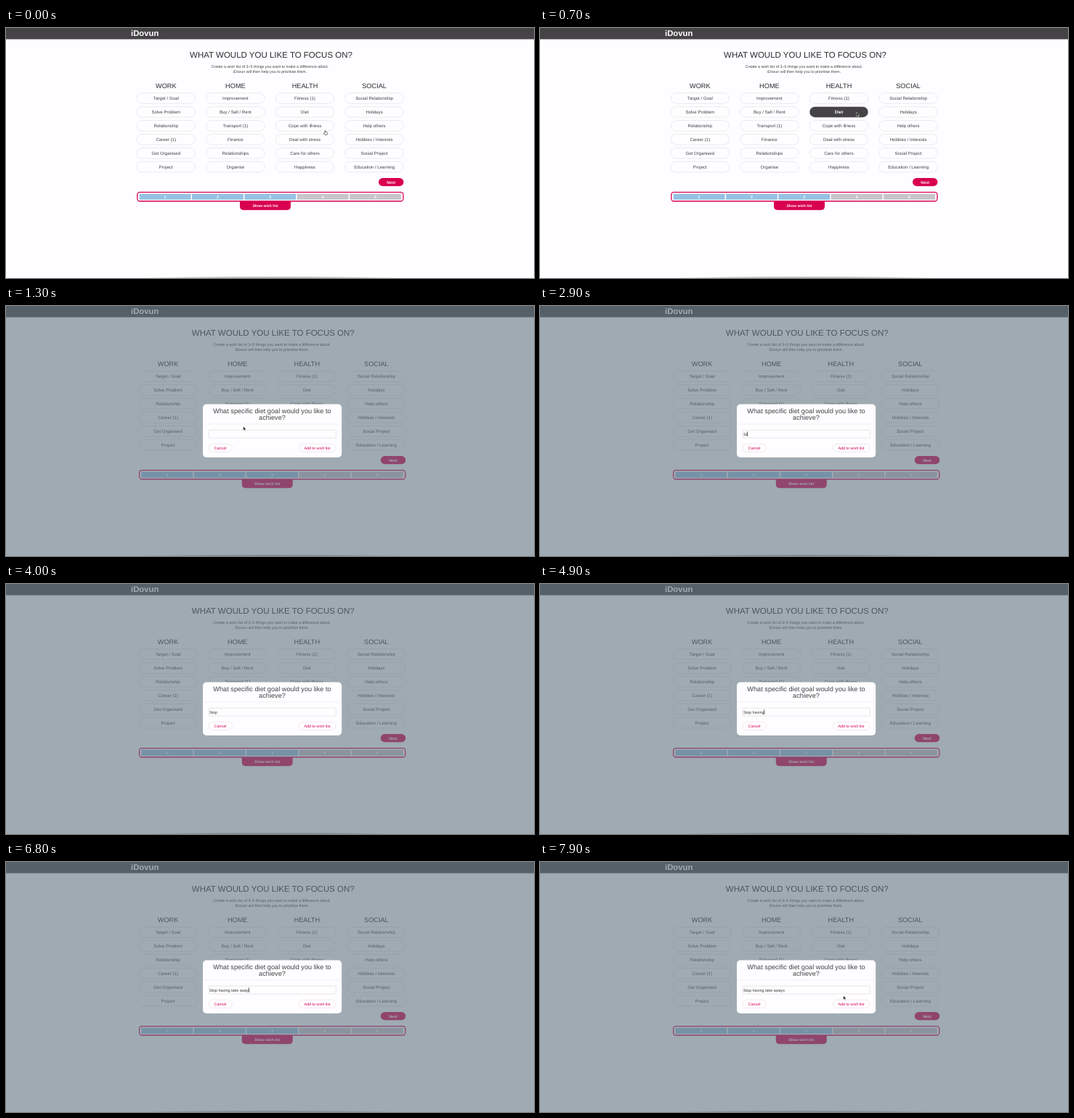
Write an HTML page that moves like this. It is 727 by 345 pixels and loops after 8000 ms.

```html
<!DOCTYPE html>
<html lang="en">
<head>
<meta charset="utf-8">
<title>Wish list</title>
<style>
  html, body { margin: 0; width: 100%; height: 100%; overflow: hidden; background: #fefdff; }
  svg { display: block; width: 727px; height: 345px; }
  text {
    font-family: "Liberation Sans", Arial, sans-serif;
    text-rendering: geometricPrecision;
    white-space: pre;
    fill: #424043;
  }
</style>
</head>
<body>
<svg id="stage" viewBox="0 0 727 345">
  <defs>
    <radialGradient id="shade">
      <stop offset="0" stop-color="#555" stop-opacity=".6"/>
      <stop offset=".75" stop-color="#777" stop-opacity=".35"/>
      <stop offset="1" stop-color="#999" stop-opacity="0"/>
    </radialGradient>
  </defs>
  <rect width="727" height="345" fill="#fefdff"/>
  <rect width="727" height="15.5" fill="#464346"/>
  <g id="page"></g>
  <ellipse cx="364" cy="346" rx="198" ry="3.5" fill="url(#shade)"/>
  <rect id="overlay" width="727" height="345" fill="#627380" fill-opacity=".6"/>
  <g id="dialog"></g>
  <g id="cursor" stroke-linejoin="round">
    <path id="arrow" d="M0 0V5.6L1.3 4.4L2.2 6.4L3.1 6L2.2 4.1H4Z" fill="#111" stroke="#fff" stroke-width=".5"/>
    <path id="hand" d="M-.5 .3Q0 -.4 .5 .3V2L2.7 2.6Q3.3 2.8 3.1 3.8L2.5 6H-.4L-2 3.7Q-1.7 2.8 -.5 3.8Z" fill="#fff" stroke="#222" stroke-width=".6"/>
    <path id="beam" d="M-1.4 -4.6Q0 -4.6 0 -3.8Q0 -4.6 1.4 -4.6M0 -3.8V3.8M-1.4 4.6Q0 4.6 0 3.8Q0 4.6 1.4 4.6" fill="none" stroke="#333" stroke-width=".7"/>
  </g>
</svg>
<script>
const LOOP = 8000, STEP = 100;
const PINK = '#d8004f';
const BRAND = 'iDovun';
const $ = id => document.getElementById(id);
const page = $('page'), dialog = $('dialog');

function add(parent, tag, attrs, content = '') {
  const el = document.createElementNS('http://www.w3.org/2000/svg', tag);
  for (const name in attrs) el.setAttribute(name, attrs[name]);
  el.textContent = content;
  parent.append(el);
  return el;
}
const label = (parent, content, x, y, size, style = '') =>
  add(parent, 'text', { x, y, 'font-size': size, 'text-anchor': 'middle', style }, content);
const box = (parent, x, y, width, height, rx, fill, stroke = 'none', strokeWidth = .7) =>
  add(parent, 'rect', { x, y, width, height, rx, fill, stroke, 'stroke-width': strokeWidth });

// Page
const logo = label($('stage'), BRAND, 172, 11.3, 11.3, 'font-weight:bold;fill:#fff;text-anchor:start');
$('stage').insertBefore(logo, page);
label(page, 'WHAT WOULD YOU LIKE TO FOCUS ON?', 365, 40.7, 11.5, 'fill:#2c2a2d');
label(page, 'Create a wish list of 3–5 things you want to make a difference about.', 363.4, 55.3, 5.35);
label(page, BRAND + ' will then help you to prioritise them.', 363.4, 61.9, 5.35);

const columns = {
  WORK: ['Target / Goal', 'Solve Problem', 'Relationship', 'Career (1)', 'Get Organised', 'Project'],
  HOME: ['Improvement', 'Buy / Sell / Rent', 'Transport (1)', 'Finance', 'Relationships', 'Organise'],
  HEALTH: ['Fitness (1)', 'Diet', 'Cope with illness', 'Deal with stress', 'Care for others', 'Happiness'],
  SOCIAL: ['Social Relationship', 'Holidays', 'Help others', 'Hobbies / Interests', 'Social Project', 'Education / Learning']
};
const pills = {};
Object.entries(columns).forEach(([heading, items], col) => {
  const x = 220.3 + col * 95.6;
  label(page, heading, x, 82.5, 9.2, 'fill:#2c2a2d');
  items.forEach((item, row) => {
    const y = 97 + row * 18.93;
    box(page, x - 40.2, y - 7.3, 80.4, 14.6, 7.3, '#fefdff', '#e3e1e6');
    const dark = box(page, x - 40.2, y - 7.3, 80.4, 14.6, 7.3, '#464346');
    dark.style.opacity = 0;
    pills[item] = { dark, text: label(page, item, x, y + 2.1, 6.1) };
  });
});

const boldWhite = 'font-weight:bold;fill:#fff';
box(page, 513, 207, 34.5, 11.2, 5.6, PINK);
label(page, 'Next', 530.2, 214.5, 5.4, boldWhite);
box(page, 180.8, 226.6, 366.2, 12.4, 3.5, '#fefdff', PINK, 1.3);
for (let i = 0; i < 5; i++) {
  const x = 183.7 + i * 72.35;
  box(page, x, 228.9, 70.8, 8, 0, i < 3 ? '#97c1e3' : '#c8c6cb');
  label(page, i + 1, x + 35.4, 234.8, 5.4, boldWhite);
}
add(page, 'path', { d: 'M322 239H392V246Q392 251.2 387 251.2H327Q322 251.2 322 246Z', fill: PINK });
label(page, 'Show wish list', 357, 247.4, 5.1, boldWhite);

// Dialog
box(dialog, 271, 135.5, 191.2, 73.5, 5, '#fefdff');
label(dialog, 'What specific diet goal would you like to', 366.5, 147.6, 9.2);
label(dialog, 'achieve?', 366.5, 156.8, 9.2);
box(dialog, 271, 162.7, 191.2, .6, 0, '#e8e5ea');
box(dialog, 279, 171.2, 175.4, 10.9, .5, '#fefdff', '#e6d9e0');
const field = label(dialog, '', 280, 178.6, 5.4, 'text-anchor:start;fill:#333');
const caret = box(dialog, 0, 173.3, .7, 6.6, 0, '#222');
box(dialog, 279, 190.2, 32.5, 11.2, 5.6, '#fefdff', '#ecdfe6');
label(dialog, 'Cancel', 295, 197.6, 5.4, 'fill:' + PINK);
box(dialog, 403.3, 190.2, 50.9, 11.2, 5.6, '#fefdff', '#ecdfe6');
label(dialog, 'Add to wish list', 428.5, 197.6, 5.4, 'fill:' + PINK);

// Timing
const phrase = 'Stop having take aways';
const keyTimes = [26, 29, 30, 31, 33, 45, 46, 47, 47, 48, 49, 51, 56, 56, 57, 59, 60, 62, 63, 64, 66, 70]
  .map(n => n * 100);
const moves = [
  { from: 0, to: 600, start: [439.5, 141.5], end: [435.8, 116.3] },
  { from: 900, to: 1400, start: [435.8, 116.3], end: [314, 172] },
  { from: 7500, to: 7900, start: [325, 171.3], end: [417.8, 184.4] }
];

const ramp = (t, from, to) => Math.min(1, Math.max(0, (t - from) / (to - from)));
const ease = p => p * p * (3 - 2 * p);

function setHover(name, amount, bold) {
  const { dark, text } = pills[name];
  dark.style.opacity = amount;
  text.style.fill = amount > .4 ? '#fff' : '#424043';
  text.style.fontWeight = bold && amount > .4 ? 'bold' : 'normal';
}

function drawCursor(t) {
  const move = moves.filter(m => m.from <= t).pop();
  const p = ease(ramp(t, move.from, move.to));
  const [x, y] = move.start.map((v, i) => v + (move.end[i] - v) * p);
  const overField = t >= 900 && x > 279 && x < 454 && y > 171 && y < 182;
  const shape = t < 600 ? 'hand' : overField ? 'beam' : 'arrow';
  for (const id of ['arrow', 'hand', 'beam']) $(id).style.display = id === shape ? '' : 'none';
  $('cursor').setAttribute('transform', `translate(${x} ${y})`);
  $('cursor').style.display = t >= 2600 && t < 7500 ? 'none' : '';
}

function drawTyping(t) {
  const pressed = keyTimes.filter(k => k <= t);
  const lastKey = pressed.length ? pressed[pressed.length - 1] : 700;
  field.textContent = phrase.slice(0, pressed.length);
  caret.setAttribute('x', 280 + field.getComputedTextLength());
  caret.style.display = Math.floor((t - lastKey) / 500) % 2 ? 'none' : '';
}

function draw(t) {
  const open = t >= 800;
  page.setAttribute('transform', `translate(${open ? 2.8 : 0} 0)`);
  $('overlay').style.display = dialog.style.display = open ? '' : 'none';
  dialog.style.opacity = .2 + .8 * ramp(t, 800, 1000);
  setHover('Cope with illness', ramp(t, 0, 150) * (1 - ramp(t, 250, 400)), true);
  setHover('Diet', ramp(t, 300, 500) * (1 - ramp(t, 750, 1250)), !open);
  drawTyping(t);
  drawCursor(t);
}

const began = performance.now();
function tick() {
  const t = (performance.now() - began) % LOOP;
  draw(Math.floor(t / STEP) * STEP);
  requestAnimationFrame(tick);
}
tick();
</script>
</body>
</html>
```
